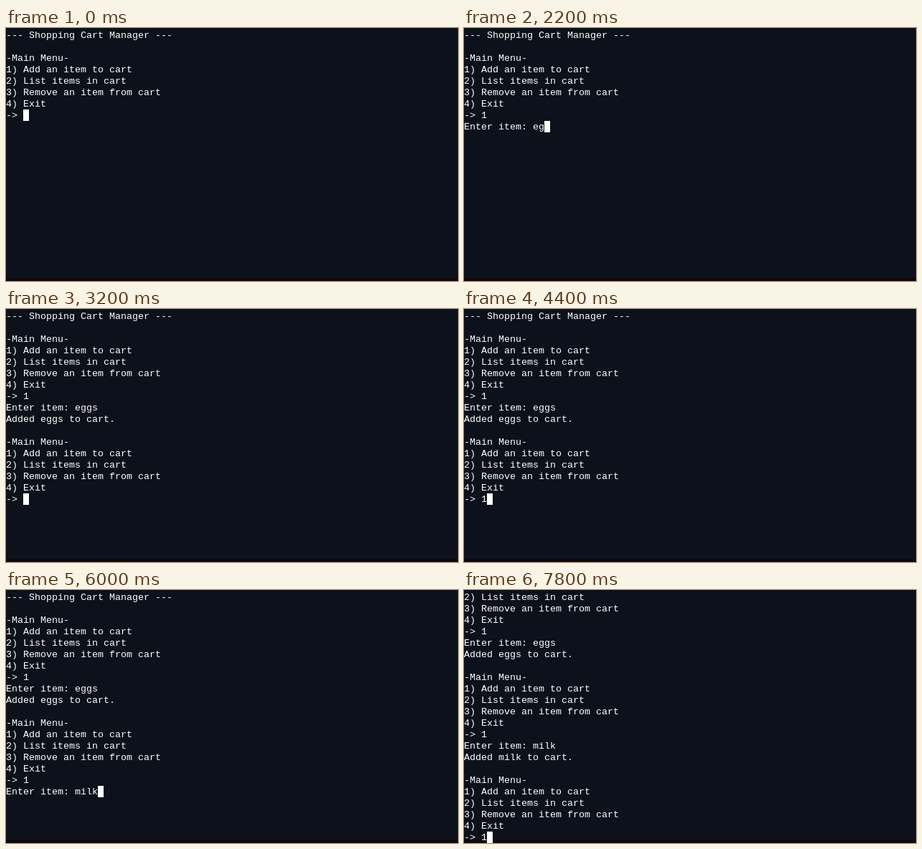
Recreate the animation shown at these times as an HTML page. Size 630x354 px, loop 8000 ms.

```html
<!DOCTYPE html>
<html lang="en">
<head>
<meta charset="utf-8">
<title>Shopping Cart Manager</title>
<style>
  html, body { margin: 0; width: 100%; height: 100%; overflow: hidden; background: #0c111b; }
  #stage { position: relative; width: 630px; height: 354px; overflow: hidden; background: #0c111b; }
  #edge { position: absolute; left: 0; top: 350px; width: 630px; height: 4px; background: #10060f; }
  #screen {
    position: absolute; left: 0; top: 3px; margin: 0; color: #fff;
    font: 13.3333px/16px "Liberation Mono", "Courier New", monospace;
    white-space: pre;
  }
  #cursor { position: absolute; width: 8px; height: 16px; background: #fff; }
</style>
</head>
<body>
<div id="stage">
  <div id="edge"></div>
  <pre id="screen"></pre>
  <div id="cursor"></div>
</div>
<script>
const LOOP = 8000, ROWS = 22, CELL_W = 8, CELL_H = 16, TOP = 2;
const menu = `-Main Menu-
1) Add an item to cart
2) List items in cart
3) Remove an item from cart
4) Exit
-> `;
const added = item => `\nAdded ${item} to cart.\n\n${menu}`;

// Each entry appends its text to the terminal at the given time.
const output = [
  [0, `--- Shopping Cart Manager ---\n\n${menu}`],
  [400, "1"],
  [800, "\nEnter item: "],
  [1800, "e"], [2200, "g"], [2400, "g"], [2600, "s"],
  [3200, added("eggs")],
  [4400, "1"],
  [5000, "\nEnter item: "],
  [5400, "m"], [5600, "i"], [5800, "lk"],
  [6400, added("milk")],
  [7800, "1"]
];

const screen = document.getElementById("screen");
const cursor = document.getElementById("cursor");
let shown = "";

function render(time) {
  const text = output.filter(([at]) => at <= time).map(([, part]) => part).join("");
  if (text === shown) return;
  shown = text;
  const lines = text.split("\n").slice(-ROWS);
  screen.textContent = lines.join("\n");
  cursor.style.left = lines[lines.length - 1].length * CELL_W + "px";
  cursor.style.top = TOP + (lines.length - 1) * CELL_H + "px";
}

const start = performance.now();
function tick() {
  render((performance.now() - start) % LOOP);
  requestAnimationFrame(tick);
}
tick();
</script>
</body>
</html>
```
